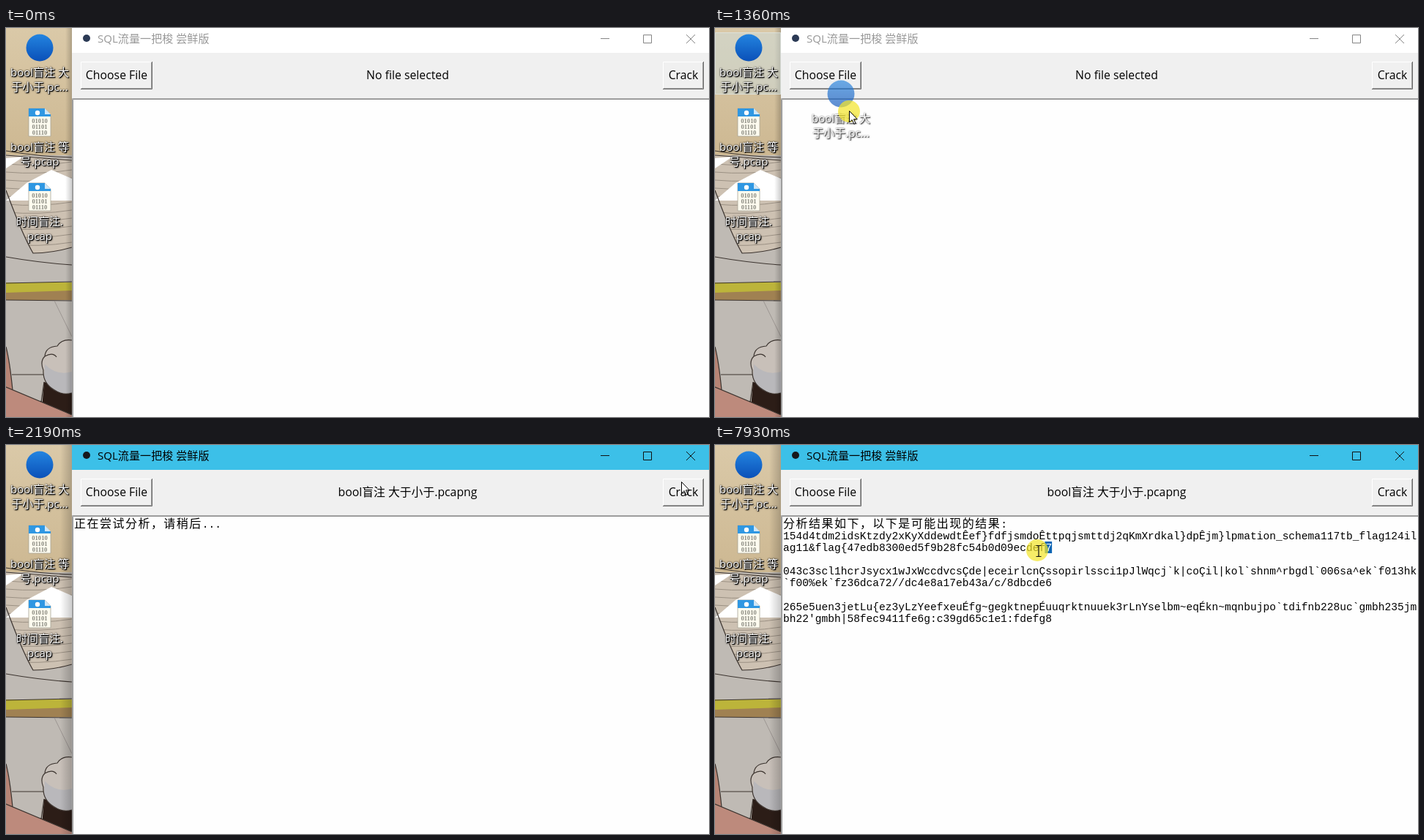
Animation of 960 by 532 pixels, one loop 8 s. Source, as an HTML page:

```html
<!DOCTYPE html>
<html lang="zh-CN">
<head>
<meta charset="utf-8">
<title>SQL流量一把梭</title>
<style>
html, body { margin: 0; width: 100%; height: 100%; overflow: hidden; background: #fff; }
svg { display: block; width: 960px; height: 532px; }
text { font-family: "Open Sans", "Noto Sans CJK SC", "Noto Sans CJK", sans-serif; font-size: 15px; white-space: pre; }
.mid { text-anchor: middle; }
.ui { font-size: 15.8px; }
.label text { fill: #fff; text-anchor: middle; }
.label { filter: drop-shadow(1px 1px 0.6px #000) drop-shadow(0 0 1px #000); }
text.bits { font: bold 8.6px "Liberation Serif", serif; fill: #8a8a80; text-anchor: middle; }
.cjk { font-family: "Noto Sans CJK SC", "Noto Sans CJK", sans-serif; font-size: 16px; letter-spacing: 1.48px; }
.mono { font-family: "Liberation Mono", monospace; font-size: 14.57px; }
.ink { fill: none; stroke: #3c342f; stroke-width: 1.2; }
#title { font-size: 15.1px; fill: #999; }
#controls { fill: none; stroke: #858585; }
.active #title { fill: #000; }
.active #controls { stroke: #111; }
.active #bar { fill: #3cc0e8; }
.active #badge { fill: #16181c; }
</style>
</head>
<body>
<svg id="stage" viewBox="0 0 960 532">
  <defs>
    <linearGradient id="wall" x1="0" y1="0" x2="0" y2="1">
      <stop offset="0" stop-color="#dac9a8"/><stop offset="1" stop-color="#cdb892"/>
    </linearGradient>
    <linearGradient id="shade">
      <stop offset="0" stop-opacity="0"/><stop offset="1" stop-opacity=".2"/>
    </linearGradient>
    <linearGradient id="blue" x1="0" y1="0" x2="0" y2="1">
      <stop offset="0" stop-color="#2384e0"/><stop offset="1" stop-color="#0a50b8"/>
    </linearGradient>
    <clipPath id="desk"><rect width="90" height="532"/></clipPath>
    <clipPath id="sheet"><path d="M0 173L90 180V300Q62 308 37 308Q22 282 0 222Z"/></clipPath>
    <g id="page">
      <path d="M31 0H53L61 8V38H31Z" fill="#fdfbef" stroke="#a8a598" stroke-width=".8"/>
      <path d="M31 0H53V8H61V11H31Z" fill="#2f97e2"/>
      <path d="M53 0L61 8H53Z" fill="#cfe6f6"/>
      <circle cx="43" cy="6" r="3.2" fill="#fff"/>
      <text class="bits" x="46" y="20">01010</text>
      <text class="bits" x="46" y="28">01101</text>
      <text class="bits" x="46" y="36">01110</text>
    </g>
  </defs>

  <g clip-path="url(#desk)">
    <rect width="90" height="532" fill="#bfbab4"/>
    <rect width="90" height="174" fill="url(#wall)"/>
    <path d="M0 173L90 180V300Q62 308 37 308Q22 282 0 222Z" fill="#cdc1b2"/>
    <g id="rules" class="ink" clip-path="url(#sheet)" style="stroke:#8f8478;stroke-width:.8"></g>
    <path d="M0 236L28 212L62 194L90 206V236Z M0 178L24 176L0 192Z" fill="#fff"/>
    <path class="ink" d="M0 168Q45 176 90 177M0 174L90 181M0 222Q22 282 37 308Q62 308 90 300M0 313Q45 321 90 324"/>
    <path d="M0 348H90V362H0Z" fill="#bcb43a"/>
    <path d="M0 362L90 359V372H0Z" fill="#a08152"/>
    <path class="ink" d="M0 349L90 347M0 372L90 373M8 474H52"/>
    <path class="ink" d="M66 373L90 422" style="stroke:#938d89;stroke-width:.8"/>
    <path d="M52 484L90 498V532H48Z" fill="#2c1d17"/>
    <path d="M0 436Q5 455 9 495L0 491Z" fill="#b78475"/>
    <path d="M0 491L90 529V532H0Z" fill="#bd8a7c"/>
    <path d="M90 427Q76 425 70 435Q54 436 53 449Q46 456 51 468Q50 486 66 495Q78 503 90 499Z" fill="#c8c0b9"/>
    <path d="M53 460Q69 476 90 470V499Q64 503 52 480Z" fill="#b9b8bb"/>
    <path class="ink" d="M90 427Q76 425 70 435Q54 436 53 449Q46 456 51 468Q50 486 66 495Q78 503 90 499M53 449Q64 443 69 450M0 436Q5 455 9 495M0 491L90 529M52 484L48 512"/>
    <rect id="shadow" y="0" height="532" fill="url(#shade)"/>
  </g>

  <rect id="hover" x=".5" y="6.5" width="89" height="84" fill="#c9dde2" fill-opacity=".45" stroke="#e2edf0" stroke-opacity=".65"/>
  <g id="file">
    <circle cx="46" cy="27" r="18.5" fill="url(#blue)"/>
    <g class="label"><text x="46" y="66">bool盲注 大</text><text x="46" y="86">于小于.pc...</text></g>
  </g>
  <use href="#page" y="110"/>
  <g class="label"><text x="46" y="168">bool盲注 等</text><text x="46" y="188">号.pcap</text></g>
  <use href="#page" y="212"/>
  <g class="label"><text x="46" y="270">时间盲注.</text><text x="46" y="290">pcap</text></g>

  <g id="window">
    <rect x="90" width="870" height="532" fill="#fefefe"/>
    <rect id="bar" x="90" width="870" height="34" fill="#fff"/>
    <circle id="badge" cx="110" cy="14" r="5" fill="#2b3a55"/>
    <text id="title" x="125" y="20">SQL流量一把梭 尝鲜版</text>
    <path id="controls" d="M812 14.5H824M870.5 9.5H881.5V20.5H870.5ZM929 9L941 21M941 9L929 21"/>
    <rect x="90" y="34" width="870" height="63" fill="#f0f0f0"/>
    <path d="M90.5 532V96.5H960" fill="none" stroke="#a9a9a9"/>
    <path d="M91.5 532V97.5H960" fill="none" stroke="#8f8f8f"/>
    <g id="buttons"></g>
    <text id="name" class="mid ui" x="548.5" y="70"></text>
    <g id="output"></g>
  </g>

  <use id="ghost" href="#file" opacity=".65"/>
  <circle id="press" r="15" fill="#f2e52c" fill-opacity=".72"/>
  <path id="arrow" d="M.5 .5V16L4.2 12.6L6.8 18.4L9 17.4L6.5 11.8H11.3Z" fill="#fff" stroke="#000" stroke-width="1"/>
  <path id="beam" d="M-3.5 -7.5H-1Q0 -7.5 0 -6.5Q0 -7.5 1 -7.5H3.5M0 -6.5V6.5M-3.5 7.5H-1Q0 7.5 0 6.5Q0 7.5 1 7.5H3.5" fill="none" stroke="#111" stroke-width="1.2"/>
</svg>
<script>
const LOOP = 8000, CHAR = 8.742, LEFT = 93;
const $ = id => document.getElementById(id);
const show = (el, on) => { el.style.display = on ? "" : "none"; };
const move = (el, x, y) => el.setAttribute("transform", `translate(${x} ${y})`);

function add(parent, tag, attrs, text) {
  const el = document.createElementNS("http://www.w3.org/2000/svg", tag);
  for (const key in attrs) el.setAttribute(key, attrs[key]);
  if (text) el.textContent = text;
  return parent.appendChild(el);
}

for (let y = 186; y < 310; y += 11) {
  add($("rules"), "path", { d: `M0 ${y}Q45 ${y + 4} 90 ${y - 3}` });
}

// A raised button; the returned function sets whether it is held down.
function button(x, w, label) {
  const g = add($("buttons"), "g", {});
  const r = x + w, fill = "none";
  add(g, "rect", { x, y: 46, width: w, height: 38, fill: "#f0f0f0" });
  const light = add(g, "path", { d: `M${x + .5} 83V46.5H${r - 1}`, fill });
  add(g, "path", { d: `M${r - 1.5} 47V82.5H${x + 1}`, fill, stroke: "#a0a0a0" });
  const dark = add(g, "path", { d: `M${r - .5} 46V83.5H${x}`, fill });
  add(g, "text", { x: x + w / 2, y: 70, class: "mid ui" }, label);
  const press = down => {
    light.setAttribute("stroke", down ? "#696969" : "#fff");
    dark.setAttribute("stroke", down ? "#fff" : "#696969");
  };
  press(false);
  return press;
}
button(102, 98, "Choose File");
const pressCrack = button(897, 56, "Crack");

// A heading is full-width text followed by a half-width tail.
function heading(text, tail) {
  const g = add($("output"), "g", {});
  add(g, "text", { x: LEFT, y: 113, class: "cjk" }, text);
  add(g, "text", { x: LEFT + text.length * CHAR * 2, y: 113, class: "mono" }, tail);
  return g;
}
const waiting = heading("正在尝试分析，请稍后", "...");
const found = heading("分析结果如下，以下是可能出现的结果", ":");

const rows = [
  "154d4tdm2idsKtzdy2xKyXddewdtÊef}fdfjsmdoÊttpqjsmttdj2qKmXrdkal}dpÊjm}lpmation_schema117tb_flag124il",
  "ag11&flag{47edb8300ed5f9b28fc54b0d09ecdef7",
  "",
  "043c3scl1hcrJsycx1wJxWccdvcsÇde|eceirlcnÇssopirlssci1pJlWqcj`k|coÇil|kol`shnm^rbgdl`006sa^ek`f013hk",
  "`f00%ek`fz36dca72//dc4e8a17eb43a/c/8dbcde6",
  "",
  "265e5uen3jetLu{ez3yLzYeefxeuÉfg~gegktnepÉuuqrktnuuek3rLnYselbm~eqÉkn~mqnbujpo`tdifnb228uc`gmbh235jm",
  "bh22'gmbh|58fec9411fe6g:c39gd65c1e1:fdefg8"
];
const results = add($("output"), "g", {});
rows.forEach((row, i) => add(results, "text", { x: LEFT, y: 128.5 + 16.2 * i, class: "mono" }, row));

const picked = add($("output"), "g", {});
const lastX = LEFT + 41 * CHAR;
add(picked, "rect", { x: lastX - 1, y: 132, width: 9.7, height: 16, fill: "#0a64b4" });
add(picked, "text", { x: lastX, y: 144.7, class: "mono", fill: "#fff" }, "7");

// Pointer legs: first step, last step, number of steps, from, to, easing.
const out = p => 1 - (1 - p) ** 2;
const both = p => p * p * (3 - 2 * p);
const legs = [
  [190, 950, 11, [790, 515], [42, 43], out],
  [1020, 1020, 1, [42, 43], [44, 43], out],
  [1220, 1500, 5, [67, 52], [298, 173], both],
  [1570, 1980, 7, [298, 173], [916, 54], both],
  [2050, 2050, 1, [916, 54], [922, 50], out],
  [7180, 7790, 9, [910, 56], [461, 143], both],
  [7860, 7930, 2, [454, 144], [442, 145], out]
];

function pointer(t) {
  const leg = legs.filter(l => t >= l[0]).pop();
  if (!leg) return null;
  const [start, end, steps, a, b, ease] = leg;
  if (steps === 1) return b;
  const step = Math.min(steps - 1, Math.floor((t - start) / (end - start) * (steps - 1) + 1e-6));
  const p = ease(step / (steps - 1));
  return a.map((v, i) => Math.round(v + (b[i] - v) * p));
}

function draw(t) {
  const within = (a, b) => t >= a && t < b;
  const at = pointer(t);
  const [x, y] = at || [0, 0];
  const dragging = within(1220, 1500);
  const selecting = t >= 7860;
  const overText = x > 91 && y > 98 && !dragging;
  const active = t >= 2120;
  const reach = active ? 16 : 9;

  $("stage").classList.toggle("active", active);
  $("shadow").setAttribute("x", 90 - reach);
  $("shadow").setAttribute("width", reach);
  $("name").textContent = t < 1570 ? "No file selected" : "bool盲注 大于小于.pcapng";
  pressCrack(within(2120, 2190));

  show(waiting, within(2190, 6910));
  show(found, t >= 6910);
  show(results, t >= 6980);
  show(picked, t >= 7930);

  show($("hover"), dragging || (at && x < 90 && y > 5 && y < 91));
  show($("ghost"), dragging);
  move($("ghost"), x - 57, y - 50);
  show($("press"), dragging || within(2120, 2190) || selecting);
  move($("press"), selecting ? x - 2 : x, selecting ? y - 1 : y + 1);
  show($("arrow"), at && !overText);
  show($("beam"), at && overText);
  move($("arrow"), x, y);
  move($("beam"), x, y);
}

function frame() {
  draw(performance.now() % LOOP);
  requestAnimationFrame(frame);
}
frame();
</script>
</body>
</html>
```
